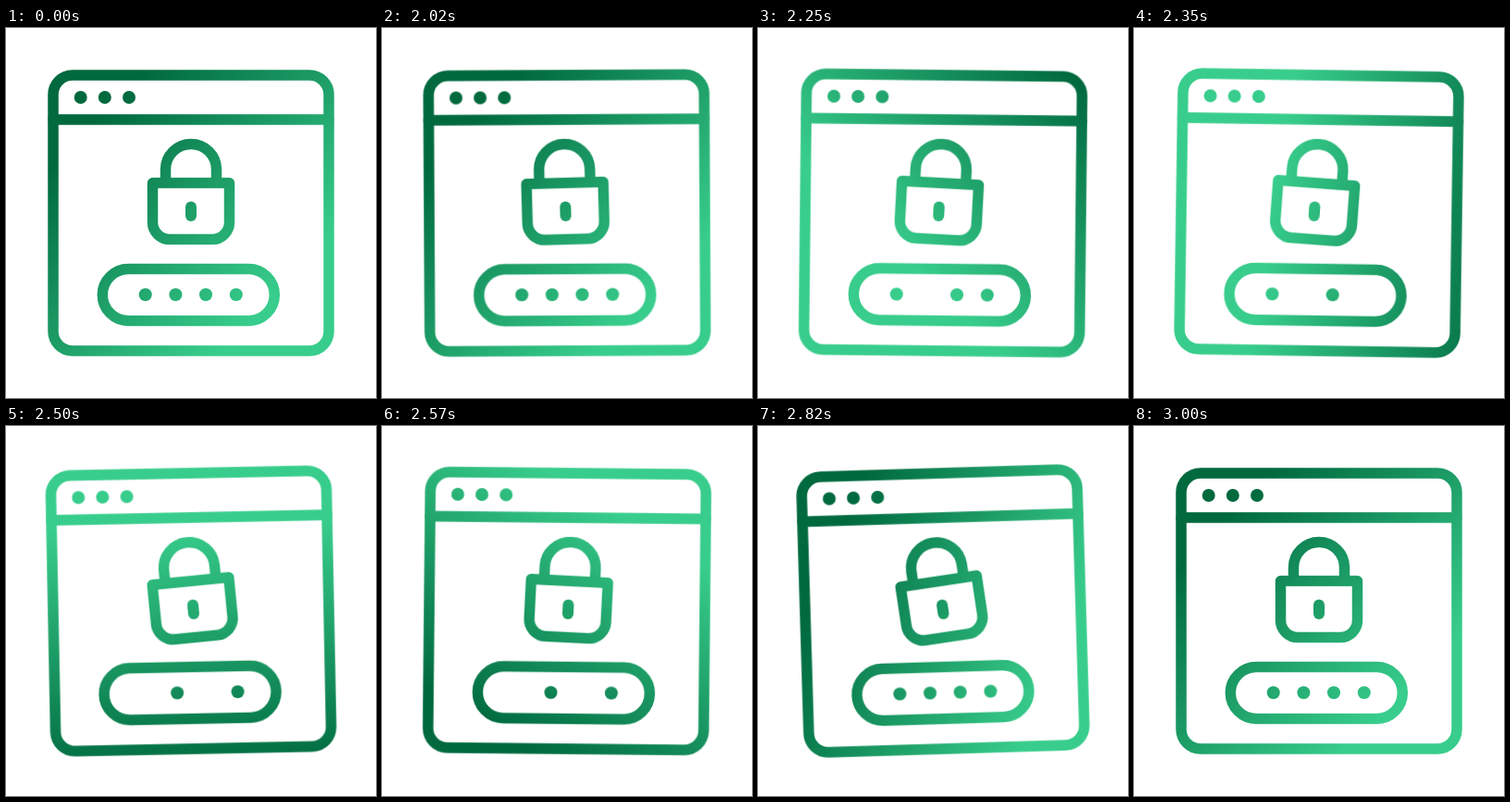
An HTML page that plays this animation: 400x400 px, repeating every 3020 ms.

```html
<!DOCTYPE html>
<html lang="en">
<head>
<meta charset="utf-8">
<title>Password lock</title>
<style>
  @property --turn { syntax: "<angle>"; inherits: true; initial-value: 45deg; }

  html, body { margin: 0; width: 100%; height: 100%; overflow: hidden; background: #fff; }
  svg { display: block; width: 100%; height: 100%; animation: turn 3020ms infinite; }

  .line { fill: none; stroke: url(#green); stroke-width: 11.5; stroke-linecap: round; stroke-linejoin: round; }
  .dot { fill: url(#green); }
  .window, .lock { animation: shake 3020ms linear infinite; }
  .window { --amp: 2deg; transform-origin: 200px 200px; }
  .lock { --amp: 10deg; transform-origin: 200px 198px; }
  .slide { animation: slide 3020ms linear infinite; }
  .key { animation: 3020ms step-end infinite; }
  .key1 { animation-name: blink1; }
  .key2 { animation-name: blink2; }
  .key3 { animation-name: blink3; }
  .key4 { animation-name: blink4; }

  /* Everything rests for two seconds, then moves for one. */
  @keyframes turn {
    0%, 66.88% { --turn: 45deg; }
    66.89% { --turn: 50deg; animation-timing-function: cubic-bezier(.3, .2, .55, 1); }
    99.33%, 100% { --turn: 405deg; }
  }
  @keyframes shake {
    0%, 66.88% { transform: rotate(0deg); }
    66.89% { transform: rotate(calc(var(--amp) * -.15)); }
    71.19% { transform: rotate(calc(var(--amp) * -1)); }
    76.32% { transform: rotate(var(--amp)); }
    81.62% { transform: rotate(calc(var(--amp) * -1)); }
    87.09% { transform: rotate(var(--amp)); }
    92.38% { transform: rotate(calc(var(--amp) * -1)); }
    99.33%, 100% { transform: rotate(0deg); }
  }
  @keyframes slide {
    0%, 66.88% { transform: translateX(0); }
    66.89% { transform: translateX(-1.5px); }
    68.2%, 71.19% { transform: translateX(-4px); }
    77.81% { transform: translateX(-5px); }
    82.78% { transform: translateX(2.5px); }
    88.41% { transform: translateX(-.5px); }
    99.33%, 100% { transform: translateX(0); }
  }
  @keyframes blink1 { 0%, 86% { opacity: 1; } 80.5% { opacity: 0; } }
  @keyframes blink2 { 0%, 80.5% { opacity: 1; } 69.5% { opacity: 0; } }
  @keyframes blink3 { 0%, 92% { opacity: 1; } 80.5% { opacity: 0; } }
  @keyframes blink4 { 0%, 80.5% { opacity: 1; } 75% { opacity: 0; } }
</style>
</head>
<body>
<svg id="stage" viewBox="0 0 400 400">
  <defs>
    <linearGradient id="green" gradientUnits="userSpaceOnUse" x1="70" y1="200" x2="340" y2="200" gradientTransform="rotate(45 245 200)">
      <stop offset="0" stop-color="#00693e"/>
      <stop offset="1" stop-color="#38cd8c"/>
    </linearGradient>
  </defs>

  <g class="window">
    <rect class="line" x="51" y="51" width="298" height="298" rx="21"/>
    <path class="line" d="M51 99H349"/>
    <circle class="dot" cx="80.7" cy="75" r="7"/>
    <circle class="dot" cx="106.8" cy="75" r="7"/>
    <circle class="dot" cx="133" cy="75" r="7"/>
    <rect class="line" x="104.3" y="260.5" width="186" height="56" rx="28"/>
    <circle class="dot key key1" cx="150.7" cy="288.3" r="7"/>
    <circle class="dot key key2" cx="183.4" cy="288.3" r="7"/>
    <circle class="dot key key3" cx="216" cy="288.3" r="7"/>
    <circle class="dot key key4" cx="248.8" cy="288.3" r="7"/>
  </g>

  <g class="slide">
    <g class="lock">
      <path class="line" d="M172.5 167V153a27.5 27.5 0 0 1 55 0V167"/>
      <path class="line" d="M158.5 167.5H241.5V210a18.5 18.5 0 0 1-18.5 18.5H177a18.5 18.5 0 0 1-18.5-18.5Z"/>
      <rect class="dot" x="194" y="187.5" width="12" height="21.5" rx="6"/>
    </g>
  </g>
</svg>
<script>
  const stage = document.getElementById("stage");
  const green = document.getElementById("green");

  // CSS cannot animate gradientTransform, so pass the animated angle on.
  function paint() {
    const turn = parseFloat(getComputedStyle(stage).getPropertyValue("--turn"));
    green.setAttribute("gradientTransform", `rotate(${turn} 245 200)`);
    requestAnimationFrame(paint);
  }
  paint();
</script>
</body>
</html>
```
